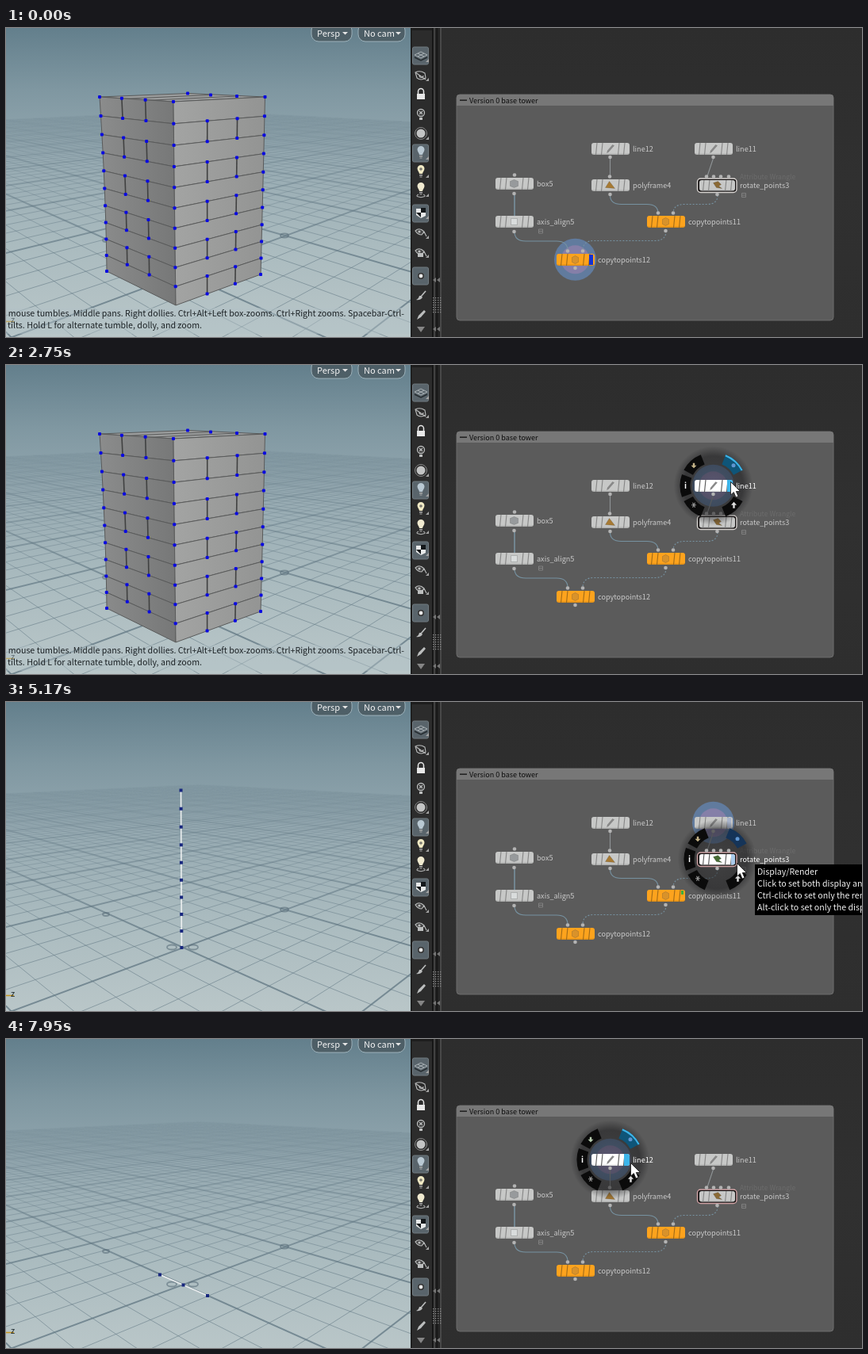
Write an HTML page with a canvas that moves like this. It is 1079 px wide and 390 px high and loops after 8000 ms.

```html
<!DOCTYPE html>
<html lang="en">
<head>
<meta charset="utf-8">
<title>Node network</title>
<style>
html, body { margin: 0; width: 100%; height: 100%; overflow: hidden; background: #2e2e2e; }
canvas { display: block; }
</style>
</head>
<body>
<canvas id="stage" width="1079" height="390"></canvas>
<script>
const ctx = document.getElementById('stage').getContext('2d');
const LOOP = 8000, TAU = Math.PI * 2;
const FONT = '"Noto Sans CJK JP", "Noto Sans CJK SC", "Noto Sans CJK", "Open Sans", sans-serif';

// ---------- helpers ----------
function path(x, y, d, fill, stroke, width = 1) {
  ctx.save();
  ctx.translate(x, y);
  const p = new Path2D(d);
  if (fill) { ctx.fillStyle = fill; ctx.fill(p); }
  if (stroke) { ctx.strokeStyle = stroke; ctx.lineWidth = width; ctx.stroke(p); }
  ctx.restore();
}
function rect(x, y, w, h, color) {
  ctx.fillStyle = color;
  ctx.fillRect(x, y, w, h);
}
function round(x, y, w, h, r, fill, stroke, width = 1) {
  ctx.beginPath();
  ctx.roundRect(x, y, w, h, r);
  if (fill) { ctx.fillStyle = fill; ctx.fill(); }
  if (stroke) { ctx.strokeStyle = stroke; ctx.lineWidth = width; ctx.stroke(); }
}
function disc(x, y, r, fill, stroke, width = 1) {
  ctx.beginPath();
  ctx.arc(x, y, r, 0, TAU);
  if (fill) { ctx.fillStyle = fill; ctx.fill(); }
  if (stroke) { ctx.strokeStyle = stroke; ctx.lineWidth = width; ctx.stroke(); }
}
function text(str, x, y, size, color, align = 'left', weight = 400) {
  ctx.font = `${weight} ${size}px ${FONT}`;
  ctx.textAlign = align;
  ctx.fillStyle = color;
  ctx.fillText(str, x, y);
}
function withStops(gradient, ...stops) {
  stops.forEach(([at, color]) => gradient.addColorStop(at, color));
  return gradient;
}
const vertical = (y0, y1, ...stops) => withStops(ctx.createLinearGradient(0, y0, 0, y1), ...stops);
const horizontal = (x0, x1, ...stops) => withStops(ctx.createLinearGradient(x0, 0, x1, 0), ...stops);
const lerp = (a, b, k) => a + (b - a) * k;
const mix = (p, q, k) => [lerp(p[0], q[0], k), lerp(p[1], q[1], k)];
function poly(points, fill, stroke, width = 1) {
  path(0, 0, 'M' + points.map(p => p.join(' ')).join('L') + 'Z', fill, stroke, width);
}
function segment(p, q, stroke, width) {
  path(0, 0, `M${p}L${q}`, null, stroke, width);
}

// ---------- 3D view ----------
// Ground plane in two-point perspective; u runs front right, v runs back right.
function ground(u, v) {
  const a = -u * 0.057, b = v * 0.051, w = 1 + a + b;
  return [(223.5 - 300 * a + 857 * b) / w, (310 + 75 * (a + b)) / w];
}
function drawGround() {
  rect(0, 0, 510, 390, vertical(0, 390, [0, '#637f8c'], [0.2, '#7f97a1'], [0.4, '#94a8b0'], [0.7, '#aabbbf'], [1, '#b9c6c8']));
  const fade = alpha => vertical(98, 300, [0, 'rgba(96,118,130,0)'], [0.25, `rgba(96,118,130,${alpha * 0.35})`], [1, `rgba(96,118,130,${alpha})`]);
  const minor = fade(0.55), major = fade(0.75);
  for (let k = -65; k <= 65; k++) {
    const heavy = k % 5 === 0, stroke = heavy ? major : minor, width = heavy ? 2 : 1;
    const vNear = (0.15 - 1 + k * 0.057) / 0.051, uNear = (1 - 0.15 + k * 0.051) / 0.057;
    if (vNear < 65) segment(ground(k, Math.max(vNear, -65)), ground(k, 65), stroke, width);
    if (uNear > -65) segment(ground(-65, k), ground(Math.min(uNear, 65), k), stroke, width);
  }
  for (const [x, y, r] of [[209, 309.5, 6], [236, 309.5, 6], [351, 262, 5], [126, 268, 4]]) {
    ctx.beginPath();
    ctx.ellipse(x, y, r, r * 0.5, 0, 0, TAU);
    ctx.strokeStyle = 'rgba(90,110,122,.6)';
    ctx.lineWidth = 1.8;
    ctx.stroke();
  }
  path(0, 0, 'M0 370.5H10', null, '#c8961e', 1.5);
  text('z', 6, 372, 11, '#1f2b32');
}
function drawTower() {
  const left = i => [118 + 1.6 * i - 0.07 * i * i, 87 + 24.2 * i - 0.22 * i * i];
  const front = i => [211 + 0.3 * i, 93 + 28 * i - 0.23 * i * i];
  const right = i => [326.5 - 0.55 * i, 87 + 24.5 * i - 0.21 * i * i];
  const back = [229, 82.5], line = '#5a5b5b', dots = [back, [258, 84.5], [291, 86]];
  const leftShade = horizontal(118, 213, [0, '#8b8c8c'], [1, '#777878']);
  const rightShade = horizontal(211, 326, [0, '#a3a4a3'], [1, '#939493']);
  poly([left(0), back, right(0), front(0)], '#9a9c9c', line);
  segment([145, 89.5], [258, 84.5], line, 1);
  segment([176, 91.5], [291, 86], line, 1);
  for (let i = 0; i < 10; i++) {
    poly([left(i), front(i), front(i + 1), left(i + 1)], leftShade, line);
    poly([front(i), right(i), right(i + 1), front(i + 1)], rightShade, line);
    const [from, to, cuts] = i % 2 ? [front, right, [0.37, 0.7]] : [left, front, [0.3, 0.62]];
    for (const k of cuts) {
      const top = mix(from(i), to(i), k), bottom = mix(from(i + 1), to(i + 1), k);
      segment(top, bottom, '#404141', 1.6);
      dots.push(top, bottom);
    }
  }
  for (let i = 0; i <= 10; i++) dots.push(left(i), right(i), ...(i < 10 ? [front(i)] : []));
  for (const [x, y] of dots) round(x - 2, y - 2, 4, 4, 1, '#0a0ae0');
}
function drawPoints(points) {
  segment(points[0], points[points.length - 1], '#eceff0', 1.6);
  for (const [x, y] of points) rect(x - 2, y - 2, 4, 4, '#17267e');
}
function drawPill(x, w, label) {
  round(x, -6, w, 23, 9, 'rgba(62,72,77,.6)', 'rgba(178,196,204,.75)');
  text(label, x + 7, 10.5, 11, '#f2f2f2');
  path(x + w - 8.5, 5, 'M-3.500 0H3.500L0 3.500Z', '#e6e6e6');
}
function drawView(t) {
  ctx.save();
  ctx.beginPath();
  ctx.rect(0, 0, 510, 390);
  ctx.clip();
  drawGround();
  if (t < 2800) {
    drawTower();
    rect(0, 353, 510, 33, 'rgba(178,193,197,.45)');
    text('t mouse tumbles. Middle pans. Right dollies. Ctrl+Alt+Left box-zooms. Ctrl+Right zooms. Spacebar-Ctrl-', 502, 364, 10.65, '#1c2225', 'right');
    text('tilts. Hold L for alternate tumble, dolly, and zoom.', 2, 379, 10.65, '#1c2225');
  } else if (t < 7770) {
    drawPoints(Array.from({ length: 10 }, (_, i) => [220.5 + i * 0.1, 111.5 + 23.4 * i - 0.15 * i * i]));
  } else {
    drawPoints([[194, 297.5], [223.5, 310.5], [254, 324]]);
  }
  drawPill(385, 51, 'Persp');
  drawPill(444, 59, 'No cam');
  ctx.restore();
}

// ---------- toolbar ----------
function drawBulb(y, color) {
  path(523, y, 'M-2 3C-2 1-4.500-1-4.500-3.500A4.500 4.500 0 0 1 4.500-3.500C4.500-1 2 1 2 3Z', color);
  rect(521, y + 4, 4, 1.5, '#aaa');
  rect(521.5, y + 6.5, 3, 1, '#aaa');
}
function drawToolbar() {
  rect(510, 0, 39, 390, '#2c2c2c');
  rect(510, 0, 1.5, 390, '#191919');
  rect(511, 0, 26, 3, '#1d1d1d');
  for (const y of [35, 158, 234, 313]) round(512.5, y - 11, 20, 22, 2, '#59646b', '#707a80');
  const pale = '#bcbebe';
  path(523, 35, 'M-8-1L0-5L8-1L0 3ZM-4-3L4 1M4-3L-4 1', null, '#a9b1b5');
  path(523, 35, 'M-8 2L0 6L8 2', null, '#252c30', 1.4);
  path(523, 60, 'M-7-4Q-1-7 5-3L6 3Q0 7-5 3ZM-7-4L6 5M-2 0A2.500 2.500 0 1 0 3 0', null, pale, 1.1);
  path(523, 84, 'M-3.500-1V-4A3.500 3.500 0 0 1 3.500-4V-1', null, '#e8e8e8', 1.5);
  rect(518, 83, 10, 7, '#e8e8e8');
  disc(523, 107, 4.5, null, pale, 1.3);
  path(523, 107, 'M-2-2L2 2M2-2L-2 2', null, pale, 1.3);
  rect(521, 113, 4, 3, pale);
  disc(523, 133, 5.5, '#c3c4c4');
  disc(523, 133, 7.5, null, '#888');
  drawBulb(157, '#b9c8d2');
  drawBulb(181, '#f0e9c4');
  path(523, 178, 'M-2 0H2M0-2V2', null, '#555');
  drawBulb(203, '#f0ead0');
  path(523, 211, 'M-3-1Q-6 0-5 1.500Q0 4 5 1.500Q6 0 3-1', null, pale);
  path(523, 233, 'M-6-5H0V0H6V4L0 7L-6 3Z', '#e8eaea');
  path(523, 233, 'M0-6H6V0H0ZM-6 0H0V6Z', '#14181b');
  for (const y of [258, 283]) {
    path(523, y, 'M-7-2Q-2-7 4-1L1 3Q-4 3-7-2ZM4-1L7 5', '#444', pale, 1.1);
    disc(521, y - 1, 1.6, pale);
  }
  rect(519, 284, 7, 5, pale);
  disc(523, 313, 3.2, '#e8e8e8', '#333', 1.5);
  path(523, 338, 'M6-6L0 1', null, pale, 1.6);
  path(523, 338, 'M0 0L2 2Q-1 6-6 5Q-3 4-2 0Z', pale);
  path(523, 362, 'M4-6L6-4L0 3L-5 6L-3 1Z', pale);
  path(523, 380, 'M-5-3H5L0 4Z', '#858585');
  for (const y of [43, 67, 141, 166, 189, 213, 241, 266, 290]) path(532, y, 'M-3 0H1V-4Z', '#a5a5a5');
  rect(537, 0, 12, 390, '#242424');
  rect(537, 0, 1.5, 390, '#131313');
  rect(539, 0, 2, 390, '#414141');
  rect(542.5, 0, 1.5, 390, '#151515');
  rect(547, 0, 2, 390, '#484848');
  for (const y of [318, 380]) path(543, y, 'M-1-3V3L-5 0ZM4-3V3L0 0Z', '#777');
  for (let y = 340; y < 360; y += 3)
    for (let x = 538; x < 549; x += 3) rect(x, y, 1.3, 1.3, '#8b8b8b');
}

// ---------- node network ----------
const nodes = {
  line12: { x: 738, y: 145, icon: 'pen', inputs: [], output: 163 },
  line11: { x: 868, y: 145, icon: 'pen', inputs: [], output: 163 },
  box5: { x: 617, y: 189, icon: 'box', inputs: [641], output: 209 },
  polyframe4: { x: 738, y: 191, icon: 'frame', inputs: [761], output: 210 },
  rotate_points3: { x: 873, y: 191, icon: 'wrangle', inputs: [883, 892, 901, 911], output: 210 },
  axis_align5: { x: 617, y: 237, icon: 'align', inputs: [], output: 257 },
  copytopoints11: { x: 808, y: 237, icon: 'copy', inputs: [822, 841], output: 256, orange: true },
  copytopoints12: { x: 694, y: 285, icon: 'copy', inputs: [708, 727], output: 303, orange: true }
};
const icons = {
  pen: ['M3-5L5-4L-2 4L-4 5L-3 2Z', '#8a8a8a'],
  box: ['M-5-3L0-5L5-3V3L0 5L-5 3Z', '#979a9c'],
  frame: ['M-1-5L6 4L-6 3Z', '#a77a33'],
  wrangle: ['M-5-3L1-5L5-1L2 1L6 4L-1 3Z', '#8b6a35'],
  align: ['M-4-4H4V4H-4Z', '#d9dcdc'],
  copy: ['M-4-3L0-5L4-3V3L0 5L-4 3Z', '#d9922a']
};
const center = name => [nodes[name].x + 23.5, nodes[name].y + 7.3];

function drawNode(name, state) {
  const n = nodes[name], { x, y } = n;
  const hovered = state.hover === name, shown = state.display === name;
  const selected = name === 'rotate_points3';
  if (selected) round(x - 1.5, y - 1, 49.5, 17.5, 4, '#151212', state.t > 4510 ? '#d0a3a5' : '#d9d5d2', 1.4);
  ctx.save();
  ctx.beginPath();
  if (selected) ctx.roundRect(x + 1, y + 1, 45, 13.5, 3);
  else ctx.roundRect(x, y, 48, 15, 3);
  ctx.clip();
  rect(x, y, 48, 15, n.orange ? '#fda31d' : hovered ? '#ffffff' : '#c7c8c7');
  rect(x, y + 13.5, 48, 1.5, 'rgba(0,0,0,.12)');
  for (const dx of [6, 13, 34, 41]) segment([x + dx + 1, y], [x + dx - 0.5, y + 15], n.orange ? '#a06a18' : hovered ? '#555' : '#858585', 1.1);
  if (shown && hovered) rect(x + 41, y, 7, 15, '#3cb5ea');
  else if (shown) rect(x + 41, y + 1, 5, 13, n.orange ? '#1432d2' : '#a9b5cc');
  else if (hovered && state.overFlag) rect(x + 41, y, 7, 15, '#a9c9ea');
  ctx.restore();
  const [shape, tint] = icons[n.icon];
  path(x + 23.5, y + 7.5, shape, selected && hovered ? '#476b34' : tint, 'rgba(70,70,70,.3)', 0.8);
  for (const ix of n.inputs) disc(ix, y - 3.5, 2.3, '#b3b3b3');
  disc(x + 23.5, n.output, 2.3, '#b3b3b3');
  text(name, x + 52, y + 10.5, 9.1, hovered ? '#ffffff' : '#c9c9c9', 'left', hovered ? 500 : 400);
}
function drawBadge(x, y) {
  round(x - 2.5, y - 2.5, 5, 5, 0, null, '#8a8a8a', 0.8);
  segment([x - 2, y], [x + 2, y], '#8a8a8a', 0.8);
}
// Wire that leaves downwards, runs level and enters the next node from above.
function wire(x0, y0, x1, y1, dashed) {
  const s = Math.sign(x1 - x0), mid = (y0 + y1) / 2;
  ctx.setLineDash(dashed ? [2, 2] : []);
  path(0, 0, `M${x0} ${y0}Q${x0} ${mid} ${x0 + s * 14} ${mid}H${x1 - s * 14}Q${x1} ${mid} ${x1} ${y1}`, null, '#7692a1', 1.1);
  ctx.setLineDash([]);
}
function slice(cx, cy, degrees, fill, edge) {
  const a = (degrees - 20) * TAU / 360, b = (degrees + 20) * TAU / 360;
  ctx.beginPath();
  ctx.arc(cx, cy, 42, a, b);
  ctx.arc(cx, cy, 29, b, a, true);
  ctx.fillStyle = fill;
  ctx.fill();
  if (edge) {
    ctx.beginPath();
    ctx.arc(cx, cy, 41, a, b);
    ctx.strokeStyle = edge;
    ctx.lineWidth = 2;
    ctx.stroke();
  }
}
function drawRing(name, state) {
  const [cx, cy] = center(name), shown = state.display === name;
  const shade = alpha => `rgba(28,28,30,${alpha})`;
  disc(cx, cy, 50, withStops(ctx.createRadialGradient(cx, cy, 0, cx, cy, 50),
    [0, shade(0.4)], [0.5, shade(0.5)], [0.75, shade(0.55)], [1, shade(0)]));
  slice(cx, cy, 180, '#0b0b0b');
  slice(cx, cy, 228, '#0b0b0b');
  slice(cx, cy, 132, '#0b0b0b');
  slice(cx, cy, 48, state.overTemplate ? '#4a2350' : '#0b0b0b');
  slice(cx, cy, 312, shown ? '#0f5578' : state.overFlag ? '#153458' : '#0a1018', shown && '#3cb4e8');
  text('i', cx - 35, cy + 3.5, 10, '#fff', 'center', 700);
  path(cx - 24.5, cy - 25.5, 'M-1.200-3H1.200V0H3.500L0 3.500L-3.500 0H-1.200Z', name === 'line12' ? '#b9cdb0' : '#c5b489');
  disc(cx + 25.5, cy - 25.5, 2.5, '#5f95d0');
  path(cx - 24.5, cy + 24.5, 'M-3 0H3M-1.500-3L1.500 3M1.500-3L-1.500 3', null, '#999', 1.1);
  path(cx + 26, cy + 24.5, 'M-1.200 4V0H-3.500L0-4L3.500 0H1.200V4Z', state.overTemplate ? '#cf9ad2' : '#ddd');
}
function drawNetwork(state) {
  rect(549, 0, 530, 390, vertical(0, 390, [0, '#2d2d2d'], [0.5, '#303030'], [1, '#2e2e2e']));
  round(568, 84, 475, 285, 4, '#5b5b5b', '#6d6d6d');
  round(568, 84, 475, 14, [4, 4, 0, 0], '#777777');
  rect(572, 90.5, 9, 1.3, '#111');
  text('Version 0 base tower', 584, 94.5, 9.05, '#0c0c0c');

  const [dx, dy] = center(state.display);
  disc(dx, dy, 26.5, '#617b9e');
  disc(dx, dy, 18, '#857fa8');

  segment([761.5, 163], [761.5, 187], '#8f9497', 1.1);
  segment([892, 163], [884, 187], '#8f9497', 1.1);
  segment([641, 209], [641, 237], '#7f9dad', 1.3);
  wire(761.5, 211, 822, 234);
  wire(897, 211, 841, 234, true);
  wire(641, 257, 708, 281);
  wire(832, 256, 727, 281, true);
  text('Attribute Wrangle', 925, 191, 8.6, '#6c6c6c');
  drawBadge(674, 256.5);
  drawBadge(930, 211);

  for (const name in nodes) if (name !== state.hover) drawNode(name, state);
  if (state.hover === 'rotate_points3') rect(851, 238, 3, 5, '#3fae3c');
  if (state.hover) {
    drawRing(state.hover, state);
    drawNode(state.hover, state);
  }
  if (state.tooltip) {
    rect(944, 205, 135, 64, '#000');
    ['Display/Render', 'Click to set both display and render flags', 'Ctrl-click to set only the render flag', 'Alt-click to set only the display flag']
      .forEach((line, i) => text(line, 947, 218 + 15 * i, 10.65, '#f0f0f0'));
  }
}

// ---------- timeline ----------
const pointer = [
  [440, 774, 376], [530, 792, 364], [620, 811, 357], [720, 820, 356], [899, 820, 356], [900, 826, 359], [1079, 826, 359],
  [1080, 825, 350], [1280, 817, 285], [1460, 803, 205], [1640, 790, 165], [1730, 788, 155], [2200, 788, 155],
  [2210, 794, 152], [2280, 794, 152], [2300, 852, 149], [2380, 856, 149], [2390, 911, 148], [2749, 911, 148], [2750, 913, 147],
  [3690, 913, 147], [3870, 918, 160], [4050, 925, 176], [4230, 923, 184], [4330, 923, 184], [4430, 920, 196], [4510, 921, 201], [4610, 921, 203],
  [5449, 921, 203], [5450, 918, 203], [5629, 918, 203], [5630, 914, 204],
  [6200, 914, 204], [6380, 903, 203], [6560, 872, 187], [6740, 838, 164], [6940, 804, 148],
  [7020, 798, 148], [7200, 789, 153], [7400, 786, 157], [7949, 786, 157], [7950, 787, 156]
];
// Last value in a list of [start, value] that has begun.
const current = (list, t) => list.reduce((value, [at, next]) => t >= at ? next : value, null);

function drawPointer(t) {
  if (t < pointer[0][0]) return;
  const next = pointer.findIndex(p => p[0] > t);
  const b = next < 0 ? pointer[pointer.length - 1] : pointer[next];
  const a = next < 0 ? b : pointer[next - 1];
  const k = a === b ? 0 : (t - a[0]) / (b[0] - a[0]);
  path(lerp(a[1], b[1], k), lerp(a[2], b[2], k), 'M.5.5V17L4.300 13.500L7 20L10 18.700L7.300 12.500H12.500Z', '#fff', '#222', 0.9);
}
function draw(t) {
  const state = {
    t,
    display: current([[0, 'copytopoints12'], [2750, 'line11'], [5720, 'rotate_points3'], [7680, 'line12']], t),
    hover: current([[1560, 'line12'], [2290, null], [2390, 'line11'], [4510, 'rotate_points3'], [6650, null], [7020, 'line12']], t),
    overFlag: t >= 2390 && t < 2750 || t >= 4610 && t < 6400 || t >= 7300 && t < 7680,
    overTemplate: t >= 3960 && t < 4430,
    tooltip: t >= 5170 && t < 5630
  };
  drawNetwork(state);
  drawView(t);
  drawToolbar();
  drawPointer(t);
}
const start = performance.now();
function tick() {
  draw((performance.now() - start) % LOOP);
  requestAnimationFrame(tick);
}
tick();
</script>
</body>
</html>
```
